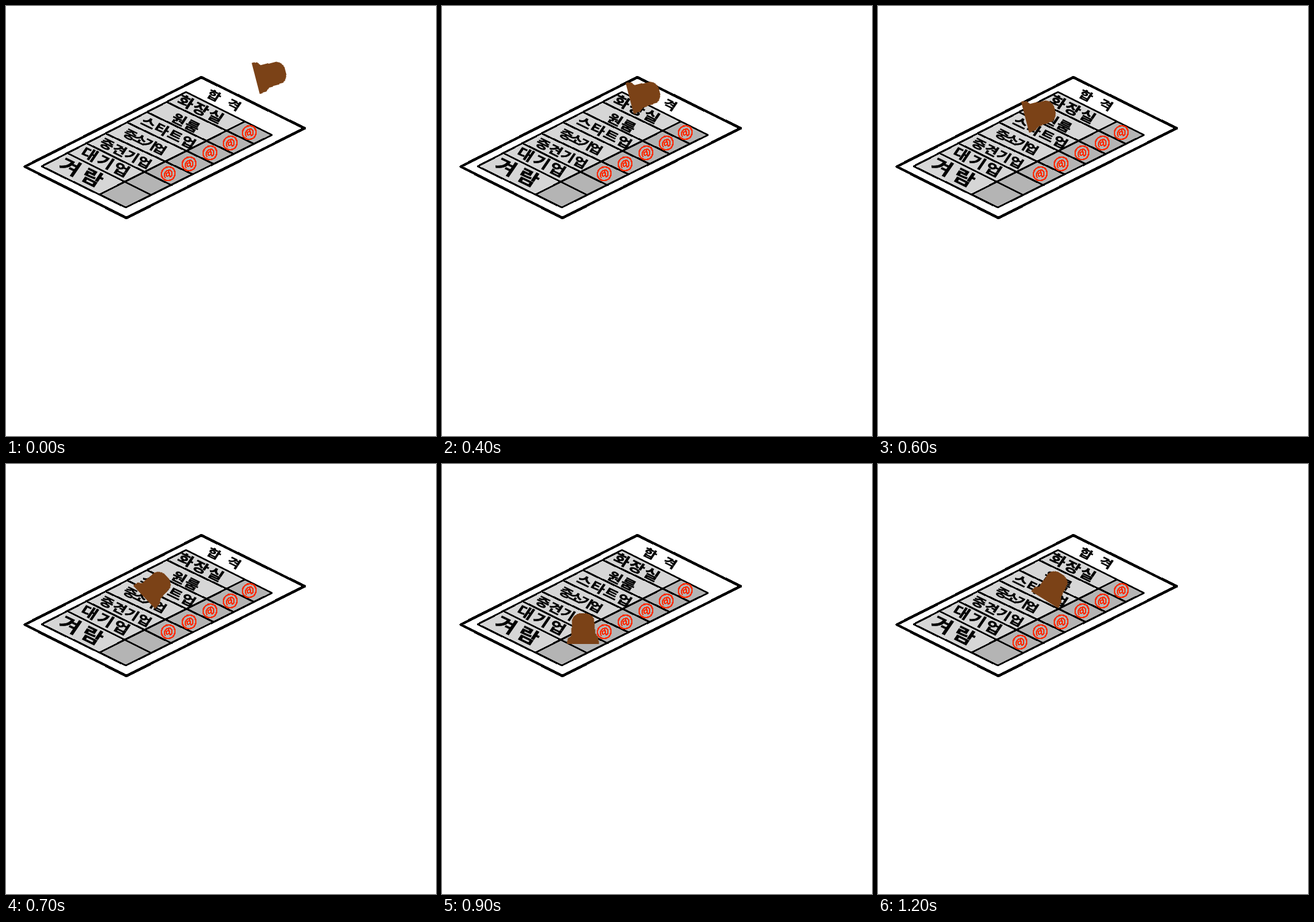
An HTML page without scripts that plays this animation: 700x700 px, repeating every 6.2 s.

```html
<!DOCTYPE html>
<html lang="ko">
<head>
<meta charset="utf-8">
<title>합격 도장</title>
<style>
  html, body { margin: 0; width: 100%; height: 100%; overflow: hidden; background: #fff; }
  svg { display: block; width: 100%; height: 100%; shape-rendering: crispEdges; }

  .ink { fill: none; stroke: #000; stroke-width: 3; stroke-linejoin: round; stroke-linecap: round; }
  .sheet { fill: #fff; stroke-width: 4.3; }

  /* Labels lie flat on the sheet */
  text {
    font-family: "Noto Sans CJK KR", "Noto Sans CJK JP", "Noto Sans CJK", sans-serif;
    font-weight: 700;
    text-anchor: middle;
    stroke: #000;
    stroke-width: .7;
  }
  .label { transform: matrix(.9, .44, -.45, .66, 0, 0); }

  .seal { fill: none; stroke: #ff2a00; stroke-width: 2.5; stroke-linecap: round; }
  .new { animation: reveal 6.2s step-end infinite; }
  @keyframes reveal {
    0% { opacity: 0; }
    16.12%, 100% { opacity: 1; }
  }

  /* Origin: middle of the stamp's base */
  .stamp { fill: #7b4217; animation: press 6.2s infinite; }
  @keyframes press {
    0%      { transform: translate(406.5px, 118px) rotate(75.4deg); animation-timing-function: steps(2, end); }
    3.22%   { transform: translate(366px, 130.5px) rotate(75.4deg); animation-timing-function: steps(2, end); }
    6.45%   { transform: translate(305.5px, 150.5px) rotate(75.4deg); animation-timing-function: steps(2, end); }
    9.67%   { transform: translate(239.5px, 181px) rotate(75.4deg); animation-timing-function: steps(1, end); }
    11.29%  { transform: translate(225px, 217px) rotate(46.5deg); animation-timing-function: steps(2, end); }
    14.51%  { transform: translate(229.5px, 293px) rotate(0deg); animation-timing-function: steps(3, end); }
    19.35%, 100% { transform: translate(271.5px, 221px) rotate(32deg); }
  }
</style>
</head>
<body>
<svg viewBox="0 0 700 700">
  <defs>
    <g id="seal" class="seal">
      <path d="M1-11C8-11 12-5 11 1C10 8 5 11 0 11C-7 11-12 6-11-1C-10-7-5-11 1-11Z"/>
      <path d="M-5 6C-8 0-4-5 2-6C7-5 8 3 4 5M-3 3C-4-2 1-3 2 0C2 4-3 5-3 3M1-4L3 5" stroke-width="2"/>
    </g>
  </defs>

  <path class="ink sheet" d="M318 116L486 199L196 345L30.5 261.5Z"/>

  <!-- Table: names on the left, seals on the right -->
  <path fill="#d6d6d6" d="M293 140L389 188L152 307L58 261Z"/>
  <path fill="#b4b4b4" d="M389 188L433 210L195 328L152 307Z"/>
  <path class="ink" d="M293 140L433 210L195 328L58 261ZM389 188L152 307
    M263 157L403 224M230 173L371 241M198 190L338 257
    M163 208L304 274M132 224L270 292M101 240L237 308"/>

  <g transform="translate(338.5 146)"><text class="label" y=".37em" font-size="23">합</text></g>
  <g transform="translate(371 161)"><text class="label" y=".37em" font-size="23">격</text></g>
  <g transform="translate(317 168)"><text class="label" x="1" y=".37em" font-size="27" letter-spacing="2">화장실</text></g>
  <g transform="translate(292 190)"><text class="label" x="1" y=".37em" font-size="25" letter-spacing="1">원룸</text></g>
  <g transform="translate(264 206)"><text class="label" x="1" y=".37em" font-size="25" letter-spacing="1">스타트업</text></g>
  <g transform="translate(226 221)"><text class="label" x="-1.5" y=".37em" font-size="23" letter-spacing="-3.5">중소기업</text></g>
  <g transform="translate(195 240)"><text class="label" y=".37em" font-size="24" letter-spacing=".5">중견기업</text></g>
  <g transform="translate(162 254)"><text class="label" x="1.5" y=".37em" font-size="28" letter-spacing="3">대기업</text></g>
  <g transform="translate(123 271)"><text class="label" x="3" y=".37em" font-size="36" letter-spacing="7">겨람</text></g>

  <use href="#seal" x="396" y="206"/>
  <use href="#seal" x="365" y="223"/>
  <use href="#seal" x="332" y="239"/>
  <use href="#seal" x="298" y="257"/>
  <use href="#seal" x="264" y="273"/>
  <use href="#seal" class="new" x="231" y="290"/>

  <path class="stamp" d="M-26 0L-25 -9L-19 -13L-18 -38Q-15 -50 0 -50.5Q14 -50 18 -41L20 -18L25 -11L26 0Z"/>
</svg>
</body>
</html>
```
